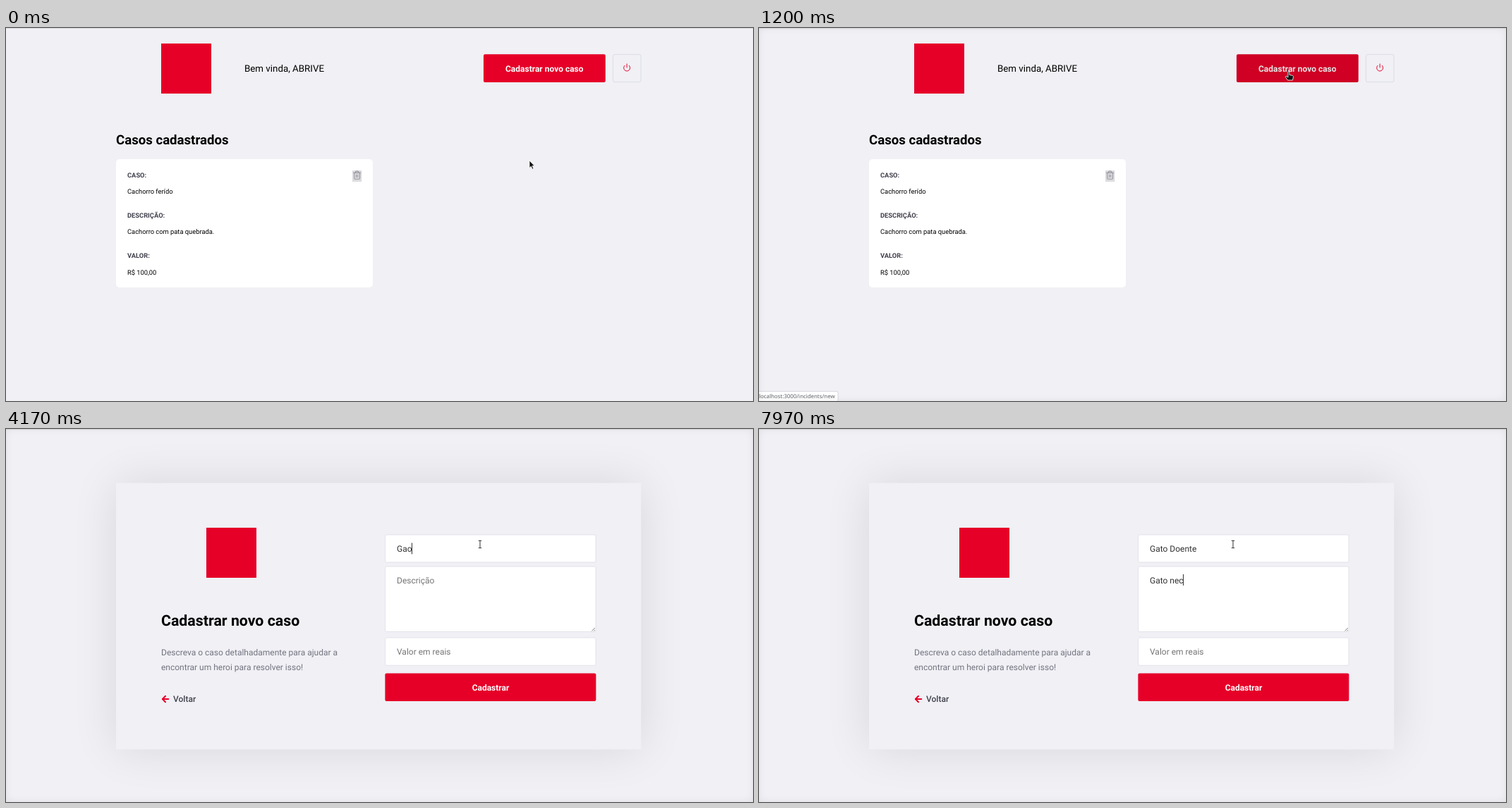
Animation, 1059 px wide and 529 px high, one loop 8000 ms. Source, as an HTML page:

```html
<!DOCTYPE html>
<html lang="pt-BR">
<head>
<meta charset="utf-8">
<title>Cadastro de casos</title>
<style>
  html, body { margin: 0; width: 100%; height: 100%; overflow: hidden; background: #f0f0f5; }
  svg { position: absolute; left: 0; top: 0; }
  text { font: 12px Roboto, sans-serif; white-space: pre; text-rendering: geometricPrecision; }
  .card text { font-size: 9.33px; }
  .card .label { font-weight: 700; fill: #41414d; }
  .title { font-size: 21.3px; font-weight: 700; }
  .button { fill: #e60028; }
  .caption { font-weight: 700; fill: #fff; text-anchor: middle; }
  .field { fill: #fff; stroke: #dcdce6; stroke-width: .8; }
  .muted { fill: #737380; }
  .icon { fill: none; stroke-width: 2; stroke-linecap: round; stroke-linejoin: round; }
  #vignette { position: absolute; left: 0; top: 0; width: 1059px; height: 529px;
    box-shadow: inset 0 0 11px rgba(0, 0, 0, .075); }
</style>
</head>
<body>
<svg width="1059" height="529" viewBox="0 0 1059 529">
  <defs>
    <filter id="blur" x="-30%" y="-50%" width="160%" height="200%">
      <feGaussianBlur stdDeviation="33"/>
    </filter>
  </defs>

  <g id="listPage">
    <rect x="220" y="22" width="71" height="71" fill="#e60028"/>
    <text x="338" y="62.3" style="font-size:13.33px">Bem vinda, ABRIVE</text>
    <g id="newCase">
      <rect class="button" x="677" y="37.3" width="172.8" height="39.7" rx="2"/>
      <text class="caption" x="763.3" y="62">Cadastrar novo caso</text>
    </g>
    <rect x="860.5" y="37.5" width="39.6" height="39.2" rx="2.5" fill="none" stroke="#dcdce6"/>
    <g class="icon" stroke="#e60028" transform="translate(874.2 50) scale(.5)">
      <path d="M18.36 6.64a9 9 0 1 1-12.73 0M12 2v10"/>
    </g>
    <text x="156" y="165" class="title" style="font-size:18.6px">Casos cadastrados</text>
    <g class="card">
      <rect x="156" y="186" width="364" height="182" rx="5" fill="#fff"/>
      <text class="label" x="172" y="212">CASO:</text>
      <text x="172" y="235.2">Cachorro ferído</text>
      <text class="label" x="172" y="269.2">DESCRIÇÃO:</text>
      <text x="172" y="292.4">Cachorro com pata quebrada.</text>
      <text class="label" x="172" y="326.3">VALOR:</text>
      <text x="172" y="349.5">R$ 100,00</text>
      <rect x="491" y="202" width="13.3" height="16" fill="#dcdcdf"/>
      <g class="icon" stroke="#96969f" transform="translate(491 202) scale(.555)">
        <path d="M3 6h18M19 6v14a2 2 0 0 1-2 2H7a2 2 0 0 1-2-2V6m3 0V4a2 2 0 0 1 2-2h4a2 2 0 0 1 2 2v2M10 11v6M14 11v6"/>
      </g>
    </g>
  </g>

  <g id="formPage">
    <rect x="156" y="76.5" width="744.3" height="378" fill="#000" opacity=".1" filter="url(#blur)"/>
    <rect x="156" y="76.5" width="744.3" height="378" fill="#f0f0f5"/>
    <rect x="284" y="140" width="71" height="71" fill="#e60028"/>
    <text class="title" x="220" y="278.6">Cadastrar novo caso</text>
    <text class="muted" x="220" y="321">Descreva o caso detalhadamente para ajudar a</text>
    <text class="muted" x="220" y="342.2">encontrar um heroi para resolver isso!</text>
    <path class="icon" stroke="#e60028" d="M230.3 383H222M226 378.8L221.8 383L226 387.2"/>
    <text x="237" y="387.3" style="font-weight:500" fill="#41414d">Voltar</text>
    <rect class="field" x="537.7" y="150" width="298.4" height="39" rx="2"/>
    <rect class="field" x="537.7" y="195" width="298.4" height="92.5" rx="2"/>
    <rect class="field" x="537.7" y="296" width="298.4" height="39.3" rx="2"/>
    <path d="M830.5 286.5L835 282M833.5 286.5L835 285" stroke="#666" stroke-width=".8"/>
    <text id="caseTitle" x="554" y="174.2"></text>
    <text id="description" x="554" y="218.6"></text>
    <text x="554" y="320.2" fill="#757575">Valor em reais</text>
    <rect class="button" x="537.4" y="346.4" width="299" height="39.6" rx="2"/>
    <text class="caption" x="687" y="371">Cadastrar</text>
    <rect id="caret" width="1" fill="#333"/>
  </g>

  <g id="status">
    <path d="M-1 515.3H110a2 2 0 0 1 2 2V530H-1z" fill="#fff" stroke="#cfcfd4" stroke-width=".8"/>
    <text x="0" y="524.9" fill="#5f6368" style="font:7.85px 'Noto Sans',sans-serif">localhost:3000/incidents/new</text>
  </g>
  <rect width="1059" height="1" fill="#d9d9de"/>
</svg>
<div id="vignette"></div>
<svg width="1059" height="529">
  <g id="pointer" stroke="#fff" stroke-width=".8" stroke-linejoin="round">
    <path id="arrow" d="M0 0V10.4L2.4 8.3L4.1 12.2L5.9 11.4L4.2 7.6H7.3Z" fill="#111"/>
    <path id="hand" d="M-1 0Q0-1 1 0V4.5L5.5 5.5Q6.8 6 6.5 7.5L5.5 12H-1.5L-4.5 7.5Q-4.5 6-3 6.5L-1 8Z" fill="#111"/>
    <g id="beam" fill="none">
      <path d="M-2.5-5.2H2.5M0-5.2V5.2M-2.5 5.2H2.5" stroke="#fff" stroke-width="2.4"/>
      <path d="M-2.2-5.2H2.2M0-5.2V5.2M-2.2 5.2H2.2" stroke="#333" stroke-width="1"/>
    </g>
  </g>
</svg>
<script>
const LOOP = 8000, HOVER = 850, PAGE_CHANGE = 1530, FOCUS = 2270, TAB = 6330;
const $ = id => document.getElementById(id);
const clamp = v => Math.max(0, Math.min(1, v));
const ramp = (t, start, length) => clamp((t - start) / length);
const show = (id, on) => $(id).style.display = on ? "" : "none";

const titleTyping = [
  [3100, "G"], [3730, "Ga"], [4170, "Gao"], [4530, "Ga"], [4630, "Gat"], [4730, "Gato"],
  [5000, "Gato "], [5230, "Gato D"], [5600, "Gato Do"], [5730, "Gato Doe"],
  [5900, "Gato Doen"], [5970, "Gato Doent"], [6030, "Gato Doente"]
];
const descriptionTyping = [
  [6870, "G"], [7000, "Ga"], [7200, "Gat"], [7300, "Gato"],
  [7470, "Gato "], [7600, "Gato n"], [7730, "Gato ne"], [7930, "Gato nec"]
];
// time, x, y
const pointerPath = [
  [30, 742, 188], [670, 752, 106], [840, 752, 76], [1200, 751, 62], [1630, 751, 62], [2100, 672, 163.5]
];

function pointerAt(t) {
  const next = pointerPath.findIndex(p => p[0] > t);
  if (next < 1) return pointerPath.at(next).slice(1);
  const [t0, x0, y0] = pointerPath[next - 1], [t1, x1, y1] = pointerPath[next];
  let k = (t - t0) / (t1 - t0);
  if (t > 1630) k = k * k * (3 - 2 * k);
  else if (t > 840) k = 1 - (1 - k) ** 2;
  return [x0 + (x1 - x0) * k, y0 + (y1 - y0) * k];
}

function fill(id, typing, placeholder, t) {
  const typed = typing.filter(step => step[0] <= t).at(-1)?.[1] ?? "";
  $(id).textContent = typed || placeholder;
  $(id).setAttribute("fill", typed ? "#333" : "#757575");
  return typed ? $(id).getComputedTextLength() : 0;
}

function draw(t) {
  const form = t >= PAGE_CHANGE;
  show("listPage", !form);
  show("formPage", form);
  show("vignette", t >= 30);
  $("newCase").style.filter = `brightness(${1 - .1 * ramp(t, HOVER, 200)})`;
  $("status").style.opacity = ramp(t, 870, 200) - ramp(t, 1700, 200);

  if (form) {
    const titleWidth = fill("caseTitle", titleTyping, "Titulo do Caso", t);
    const descriptionWidth = fill("description", descriptionTyping, "Descrição", t);
    const inTitle = t < TAB, caret = $("caret");
    caret.setAttribute("x", Math.round(554 + (inTitle ? titleWidth : descriptionWidth) - .2));
    caret.setAttribute("y", inTitle ? 161.5 : 206);
    caret.setAttribute("height", 16);
    show("caret", t >= FOCUS && !(t >= 2830 && t < 3100));
  }

  const [x, y] = pointerAt(t);
  const beam = form && y > 150, hand = !form && t >= HOVER;
  $("pointer").setAttribute("transform", `translate(${x} ${y})`);
  show("beam", beam);
  show("hand", hand);
  show("arrow", !beam && !hand);
}

const start = performance.now();
function tick() {
  draw((performance.now() - start) % LOOP);
  requestAnimationFrame(tick);
}
tick();
</script>
</body>
</html>
```
